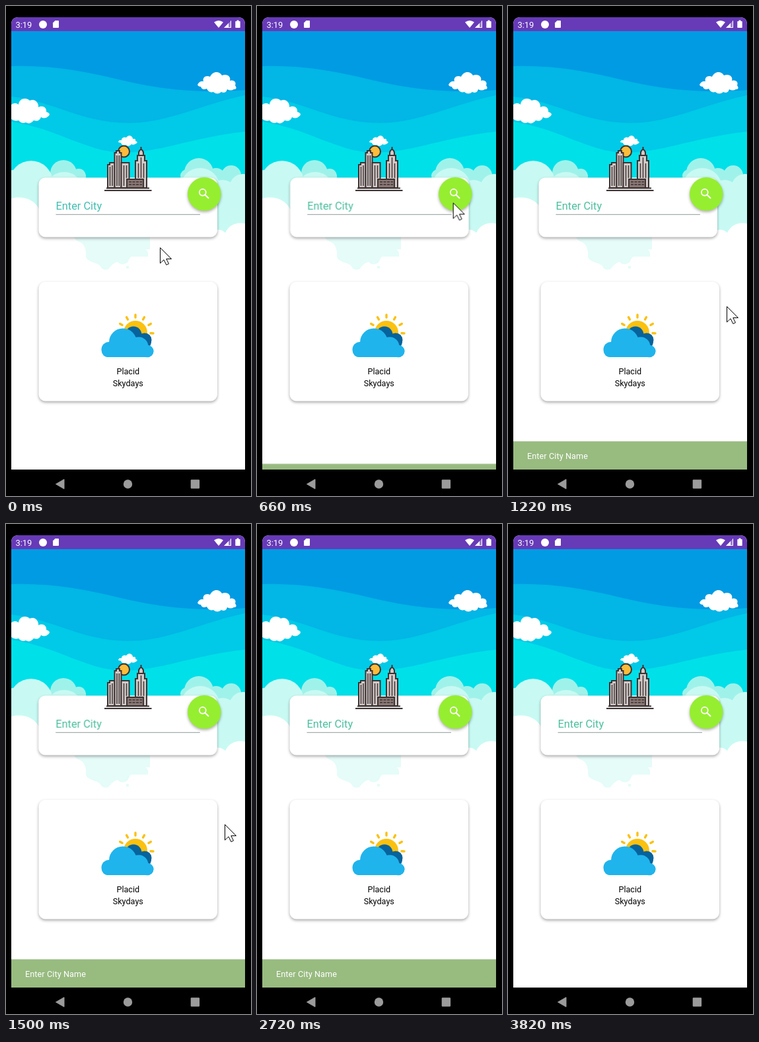
An HTML page for the animation above (3870 ms loop, 371 by 741 pixels).

```html
<!DOCTYPE html>
<html lang="en">
<head>
<meta charset="utf-8">
<title>Weather search</title>
<style>
  html, body { margin: 0; width: 100%; height: 100%; overflow: hidden; background: #000; }
  svg { display: block; width: 371px; height: 741px; }
  text { font-family: Roboto, Arial, sans-serif; font-size: 12.63px; }
  .card { fill: #fff; filter: drop-shadow(0 2.2px 2px rgba(0, 0, 0, .34)); }
  .fab { fill: #96ee30; filter: drop-shadow(0 2px 2px rgba(0, 0, 0, .33)); }
  .hint { font-size: 16.35px; }

  .form, .hint, .snack, .cursor, .press { animation: 3870ms linear infinite; }
  .form { animation-name: shake; }
  .hint { animation-name: tint; animation-timing-function: step-end; }
  .snack { animation-name: snack; }
  .cursor { animation-name: move; }
  .press { animation-name: press; animation-timing-function: step-end; }

  @keyframes shake {
    0% { transform: none; }
    15.94% { transform: none; animation-timing-function: ease-in; }
    21.32% { transform: translateX(8.2px); }
    23.7% { transform: translateX(-8.2px); }
    25.66% { transform: translateX(8.2px); }
    27.47% { transform: translateX(-8.2px); }
    29.22% { transform: translateX(4.9px); }
    31.03% { transform: translateX(-4.9px); }
    33% { transform: translateX(2px); }
    35.37% { transform: translateX(-2px); animation-timing-function: ease-out; }
    40.75%, 100% { transform: none; }
  }
  @keyframes tint {
    0% { fill: #42bfb2; }
    15.76%, 100% { fill: #4cbf9f; }
  }
  @keyframes snack {
    0% { transform: translateY(44px); }
    15.5% { transform: translateY(44px); animation-timing-function: cubic-bezier(.4, 0, .2, 1); }
    22% { transform: none; }
    92.25% { transform: none; animation-timing-function: cubic-bezier(.4, 0, .2, 1); }
    98.6%, 100% { transform: translateY(44px); }
  }
  @keyframes move {
    0% { transform: translate(233px, 365px); }
    1% { transform: translate(233px, 365px); animation-timing-function: ease-in-out; }
    10.5% { transform: translate(291px, 271px); }
    15.2% { transform: translate(291px, 271px); animation-timing-function: ease-in-out; }
    22.2% { transform: translate(329px, 447px); animation-timing-function: ease-out; }
    25.8% { transform: translate(331px, 454px); }
    46.9% { transform: translate(331px, 454px); animation-timing-function: ease-in; }
    51.9% { transform: translate(293px, 552px); animation-timing-function: ease-out; }
    60.4% { transform: translate(234px, 626px); }
    61% { transform: translate(234px, 626px); animation-timing-function: ease-in; }
    70.2%, 100% { transform: translate(322px, 743px); }
  }
  @keyframes press {
    0% { opacity: 0; }
    10.5% { opacity: 1; }
    14.2%, 100% { opacity: 0; }
  }
</style>
</head>
<body>
<svg viewBox="0 0 371 741">
  <defs>
    <clipPath id="screen"><path d="M8 701V28Q8 17 19 17H351Q362 17 362 28V701Z"/></clipPath>
    <path id="ray" d="M196 467v4"/>
  </defs>

  <g clip-path="url(#screen)">
    <rect x="8" y="17" width="354" height="684" fill="#fff"/>

    <!-- sky -->
    <path fill="#019be3" d="M8 38H362V345H8Z"/>
    <path fill="#02b6e6" d="M8 91C65 89 118 98 170 111C230 126 295 133 362 127V345H8Z"/>
    <path fill="#00cae7" d="M8 137C70 143 115 177 185 177C245 177 292 150 362 135V345H8Z"/>
    <path fill="#00e0e9" d="M8 175C60 183 90 201 135 215C205 236 265 200 362 190V345H8Z"/>

    <!-- cloud bank -->
    <g fill="#9ff2ea">
      <circle cx="87" cy="253" r="20"/><circle cx="110" cy="257" r="11"/>
      <circle cx="292" cy="252" r="22"/><circle cx="274" cy="257" r="10"/>
      <circle cx="318" cy="259" r="14"/><circle cx="341" cy="256" r="15"/>
      <path d="M66 256H121V300H66ZM265 256H355V300H265Z"/>
    </g>
    <g fill="#c8faf3">
      <circle cx="38" cy="267" r="33"/><circle cx="88" cy="280" r="29"/>
      <circle cx="12" cy="272" r="24"/>
      <circle cx="294" cy="275" r="30"/><circle cx="328" cy="285" r="22"/>
      <circle cx="359" cy="275" r="21"/>
      <path d="M8 270H110V345H8ZM264 275H362V345H264Z"/>
    </g>
    <path fill="#fff" d="M8 291C28 286 44 294 50 307C66 307 78 320 80 340H316C319 337 328 338 332 343C337 332 348 326 362 329V352H8Z"/>
    <path fill="#e5fcf9" d="M103 345H218V368H211Q216 370 215 379H191Q188 379 186 384C184 391 174 393 169 387C162 389 159 393 155 398Q149 400 145 397C141 386 128 391 121 380C122 369 119 360 112 357Q105 355 103 349ZM182 393h4v4h-4Z"/>

    <!-- drifting clouds -->
    <g fill="#fff">
      <path d="M8 149Q14 145 19 149C20 139 31 138 36 143C44 139 50 147 49 153C57 149 62 155 61 160Q68 162 65 166Q59 172 53 168Q50 176 42 173Q36 180 30 176Q24 179 19 173Q13 175 8 171Z"/>
      <path d="M290 119Q293 113 299 114C297 108 303 104 309 107C313 98 323 98 327 105C335 102 341 107 339 113C346 111 349 116 347 120Q351 126 345 126Q340 129 335 126Q333 133 326 130Q320 135 314 130Q307 132 304 125Q297 128 295 122Q291 122 290 119Z"/>
      <path d="M170 206Q171 202 175 203C175 198 181 198 182 199C186 193 192 197 192 201Q197 200 196 204Q201 206 197 208Q193 211 190 209Q186 214 181 210Q176 212 174 207Z"/>
    </g>

    <!-- status bar -->
    <rect x="8" y="17" width="354" height="21" fill="#673ab7"/>
    <g fill="#fff">
      <text x="14.5" y="32.5" style="font-size:12.9px">3:19</text>
      <circle cx="56" cy="28" r="6"/>
      <path d="M74.5 22H79Q80 22 80 23V32Q80 33 79 33H72Q71 33 71 32V25.5Z"/>
      <path d="M315 24.5Q322 19.5 329 24.5L322 33Z"/>
      <path d="M341 22V33H330Z" fill-opacity=".35"/>
      <path d="M337 26V33H330ZM340 22.8L341 22V33H330L331 32H340Z"/>
      <path d="M349.5 21.5h3V23H354q.7 0 .7.7V32.3q0 .7-.7.7H348q-.7 0-.7-.7V23.7q0-.7.7-.7h1.5Z"/>
    </g>

    <!-- search form -->
    <g class="form">
      <rect class="card" x="49.5" y="259.5" width="270.5" height="90" rx="10"/>
      <text class="hint" x="75.5" y="308">Enter City</text>
      <path d="M75.5 315.3H294" stroke="#8f9999"/>
    </g>

    <!-- city -->
    <g fill="#d2cbc9" stroke="#3d3332" stroke-width="2">
      <circle cx="178.5" cy="220" r="8.5" fill="#fbbc3b"/>
      <path d="M154 275V240H157V237H164.5V275Z"/>
      <path d="M164.5 275V222H167V219H172V222H174.5V275Z"/>
      <path d="M174.5 275V237H186.5V275Z"/>
      <path d="M196 275V234H199V226H210V234H213V275ZM204.5 219V213"/>
      <path d="M201 226V221Q204.5 213 208 221V226Z"/>
      <path d="M183 262H208V275H183Z" fill="#8a7875"/>
      <path d="M149 279H220.5M152 275.5H217"/>
    </g>
    <g stroke="#3d3332" fill="none" stroke-width="1.5">
      <path d="M157.5 243V272M161 241V272M168 226V272M171.300 226V272M178.500 241V272M182.500 241V260"/>
      <path d="M200.500 238V260M204.500 229V260M208.500 238V260"/>
      <path d="M186 266H206M186 270H206" stroke-dasharray="4 1.5"/>
    </g>

    <!-- search button -->
    <circle class="fab" cx="300.3" cy="284.3" r="25.3"/>
    <g fill="none" stroke="#fff" stroke-width="1.8">
      <circle cx="297.8" cy="281.8" r="4.95"/>
      <path d="M301.4 285.4L307.1 291.1" stroke-width="2.1"/>
    </g>

    <!-- app card -->
    <rect class="card" x="49.5" y="417" width="270.5" height="180.5" rx="10"/>
    <g stroke="#fbc110" stroke-width="3.4" stroke-linecap="round">
      <use href="#ray" transform="rotate(-60 196 494)"/>
      <use href="#ray" transform="rotate(-30 196 494)"/>
      <use href="#ray"/>
      <use href="#ray" transform="rotate(30 196 494)"/>
      <use href="#ray" transform="rotate(60 196 494)"/>
      <use href="#ray" transform="rotate(92 196 494)"/>
    </g>
    <circle cx="196" cy="494" r="18" fill="#fbc110"/>
    <g fill="#07639b">
      <circle cx="193" cy="497" r="12.5"/><circle cx="210" cy="505" r="10.5"/>
      <path d="M181 497L204 498L220 507Q220 514 215 517H181Z"/>
    </g>
    <g fill="#20b4ec">
      <circle cx="177" cy="508.5" r="21"/><circle cx="156" cy="519.5" r="11.5"/>
      <circle cx="201" cy="515" r="14.5"/><circle cx="214" cy="522" r="9.3"/>
      <rect x="145" y="513" width="78.5" height="18" rx="9"/>
    </g>
    <g text-anchor="middle">
      <text x="184.8" y="557">Placid</text>
      <text x="184.8" y="574.5">Skydays</text>
    </g>

    <g class="snack">
      <rect x="8" y="658.3" width="354" height="43" fill="#98bb80"/>
      <text x="29" y="685" fill="#fff" letter-spacing=".1">Enter City Name</text>
    </g>
  </g>

  <!-- navigation -->
  <g fill="#9b9b9b">
    <path d="M75.5 723L88 715.8V730.2Z" stroke="#9b9b9b" stroke-linejoin="round"/>
    <circle cx="184.5" cy="723" r="6.7"/>
    <rect x="279.7" y="716.3" width="13.4" height="13.4" rx="1.2"/>
  </g>

  <g class="cursor">
    <circle class="press" r="17.7" fill="#f7ee00" fill-opacity=".55"/>
    <path d="M.5 .5V24L6 18.8L9.8 26.5L13.5 24.8L9.8 17.5H17.5Z" fill="#fff" stroke="#000"/>
  </g>
</svg>
</body>
</html>
```
